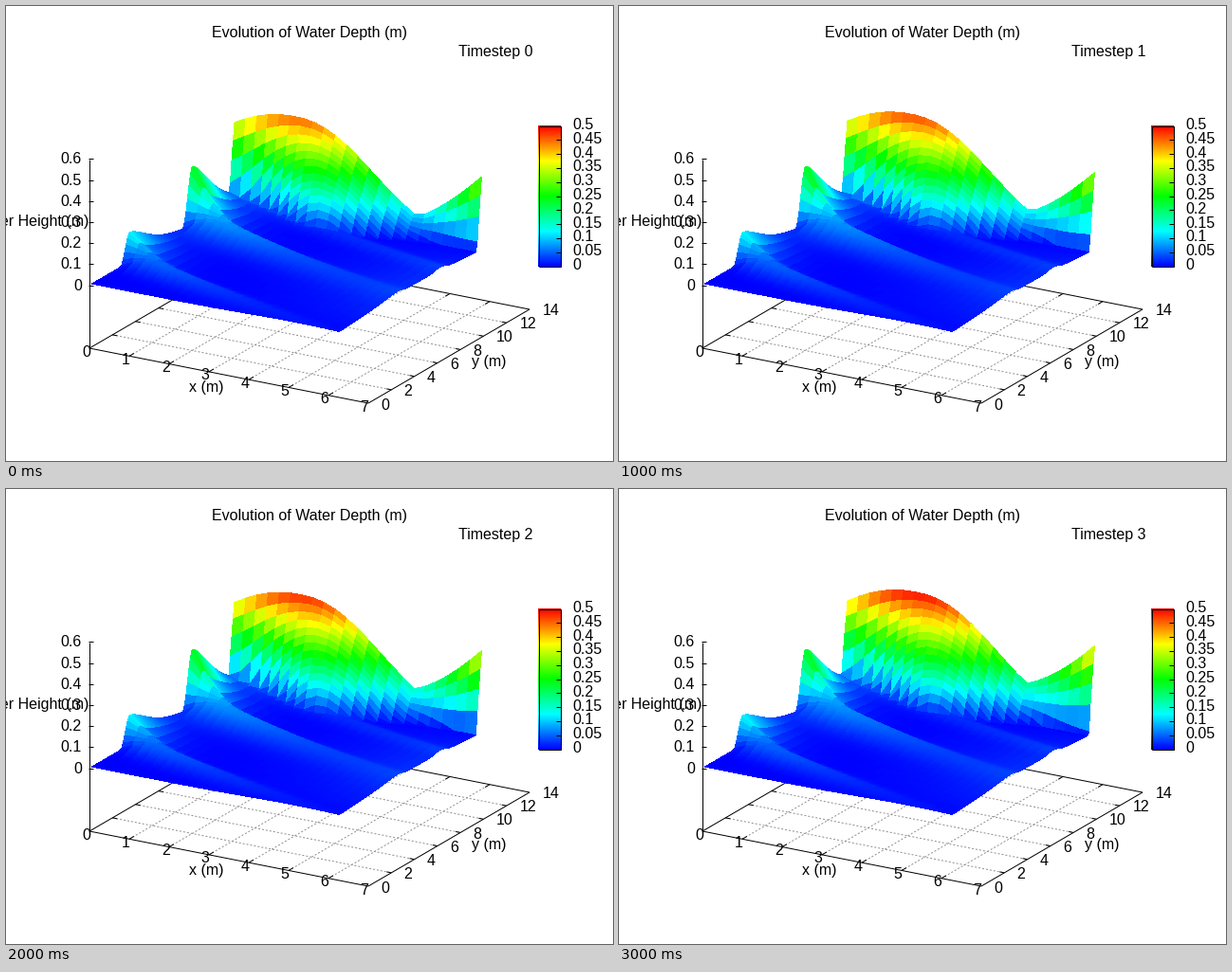
Write a matplotlib script that moves like this. It is 640x480 px and loops after 4 s.

```python
import numpy as np
import matplotlib.pyplot as plt
from matplotlib.animation import FuncAnimation
from matplotlib.collections import PolyCollection
from matplotlib.colors import LinearSegmentedColormap

W, H, DPI = 640, 480, 100
PX = 72 / DPI
plt.rcParams["font.family"] = "Liberation Sans"
plt.rcParams["font.size"] = 16 * PX

fig = plt.figure(figsize=(W / DPI, H / DPI), dpi=DPI, facecolor="white")
ax = fig.add_axes([0, 0, 1, 1])
ax.axis("off")

palette = LinearSegmentedColormap.from_list(
    "depth", ["#0000ff", "#00ffff", "#00ff00", "#ffff00", "#ff0000"], N=512)

STEPS = 4
X_MAX, Y_MIN, Y_MAX, FLOOR = 6.2, 0.2, 12.6, -0.3
X, Y = np.meshgrid(np.linspace(0, X_MAX, 23), np.linspace(Y_MIN, Y_MAX, 101))


def project(x, y, z):
    return 88 + 42 * x + 170 / 14 * y, 294.5 + 58 / 7 * x - 99 / 14 * y - 221.7 * z


def lerp(a, b, t):
    return a + (b - a) * t


def smoothstep(u):
    u = np.clip(u, 0, 1)
    return u * u * (3 - 2 * u)


def hump(start, rise, fall, height):
    """Steep front and long tail in y, fading away from the x = 0 side."""
    tail = np.maximum(Y - start - rise, 0) / fall
    return (height * smoothstep((Y - start) / rise) * np.exp(-tail ** 1.5)
            * np.exp(-X / 0.45))


def ridge(start, front, back, height, fade):
    """Oblique wave, gentle on the near slope and steep on the far one."""
    d = Y + 0.57 * X - start
    shape = np.exp(-(d / np.where(d < 0, front, back)) ** 2)
    return height * np.exp(-X / fade) * (1 - np.exp(-X / 0.5)) * shape


CALM = (hump(2.7, 0.8, 2.4, 0.14) + hump(8.1, 0.85, 2.3, 0.275)
        + ridge(3.4, 0.9, 0.5, 0.085, 2.3)
        + ridge(8.9, 1.3, 0.5, 0.12, 2.7)
        + ridge(12.6, 0.7, 0.5, 0.03, 8)
        + 0.022 * (X / X_MAX) ** 3 * np.sin(np.pi * Y / Y_MAX))


def crest(t):
    """Water depth along the back row: a broad peak and a rising right end."""
    d = X - lerp(1.55, 1.75, t)
    spread = lerp(2.5, 2.65, t) * np.where(d < 0, 1.25, 1)
    peak = lerp(0.457, 0.5, t) * np.exp(-(np.abs(d) / spread) ** 2.25)
    return peak + lerp(0.21, 0.23, t) * np.maximum(X - lerp(4.6, 4.5, t), 0)


def depth(step):
    t = step / (STEPS - 1)
    reach = 0.4 + 0.1 * t + 1.4 * np.exp(-((X - 2.7) / 1.5) ** 2)
    wall = crest(t) * np.clip(1 - (Y_MAX - Y) / reach, 0, 1) ** 0.8
    return np.maximum(CALM, wall)


def cells(a):
    """Corner values of each cell, ordered from far to near."""
    corners = np.stack([a[:-1, :-1], a[:-1, 1:], a[1:, 1:], a[1:, :-1]], -1)
    return corners[::-1].reshape(-1, 4)


def line(p, q, color="black", dash="-", z=1):
    ax.plot(*zip(p, q), color=color, lw=PX, ls=dash, solid_capstyle="butt",
            dash_capstyle="butt", zorder=z)


def label(x, y, s, ha="center"):
    return ax.text(x, y, s, ha=ha, va="baseline", zorder=6)


def floor(x, y):
    return project(x, y, FLOOR)


def draw_floor():
    dots = dict(color="#909090", dash=(0, (2, 2)))
    for x in range(1, 7):
        line(floor(x, 0), floor(x, 14), **dots)
        line(floor(x, 0), floor(x, 0.4))
        line(floor(x, 13.6), floor(x, 14))
    for y in range(2, 14, 2):
        line(floor(0, y), floor(7, y), **dots)
        line(floor(0, y), floor(0.12, y))
        line(floor(6.88, y), floor(7, y))
    corners = [(0, 0), (7, 0), (7, 14), (0, 14), (0, 0)]
    for a, b in zip(corners, corners[1:]):
        line(floor(*a), floor(*b))


def draw_labels():
    label(217, 33, "Evolution of Water Depth (m)", "left")
    for i in range(8):
        label(84.5 + 41.9 * i, 369.5 + 8.29 * i, i)
        label(395 + 24.4 * i, 425.5 - 14.2 * i, 2 * i, "left")
    label(211, 407, "x (m)")
    label(509, 380, "y (m)")
    label(87, 232, "Water Height (m)", "right")
    line((87.5, 162), (87.5, 362))
    for i in range(7):
        y = 294.5 - 22.17 * i
        line((87, y), (92, y))
        label(80, y + 5, f"{i / 10:g}", "right")


def draw_colorbar():
    ax.imshow(np.linspace(1, 0, 256)[:, None], cmap=palette, aspect="auto",
              extent=(561, 585, 275, 126), zorder=3)
    box = [(561.5, 126.5), (584.5, 126.5), (584.5, 274.5), (561.5, 274.5)]
    for a, b in zip(box, box[1:] + box[:1]):
        line(a, b, z=4)
    for i in range(11):
        y = 274.5 - 14.8 * i
        line((580, y), (585, y), z=4)
        label(597, y + 3.5, f"{i / 20:g}", "left")


draw_floor()
draw_labels()
draw_colorbar()
ax.set(xlim=(0, W), ylim=(H, 0))
surface = PolyCollection([], antialiased=False, linewidths=0, zorder=2)
ax.add_collection(surface, autolim=False)
caption = label(477, 53, "", "left")


def update(step):
    z = depth(step)
    px, py = project(X, Y, z)
    surface.set_verts(np.stack([cells(px), cells(py)], -1))
    surface.set_facecolor(palette(np.clip(cells(z).mean(1) / 0.5, 0, 1)))
    caption.set_text(f"Timestep {step}")
    return surface, caption


anim = FuncAnimation(fig, update, frames=STEPS, interval=1000, repeat=True,
                     repeat_delay=0)
plt.show()
```
